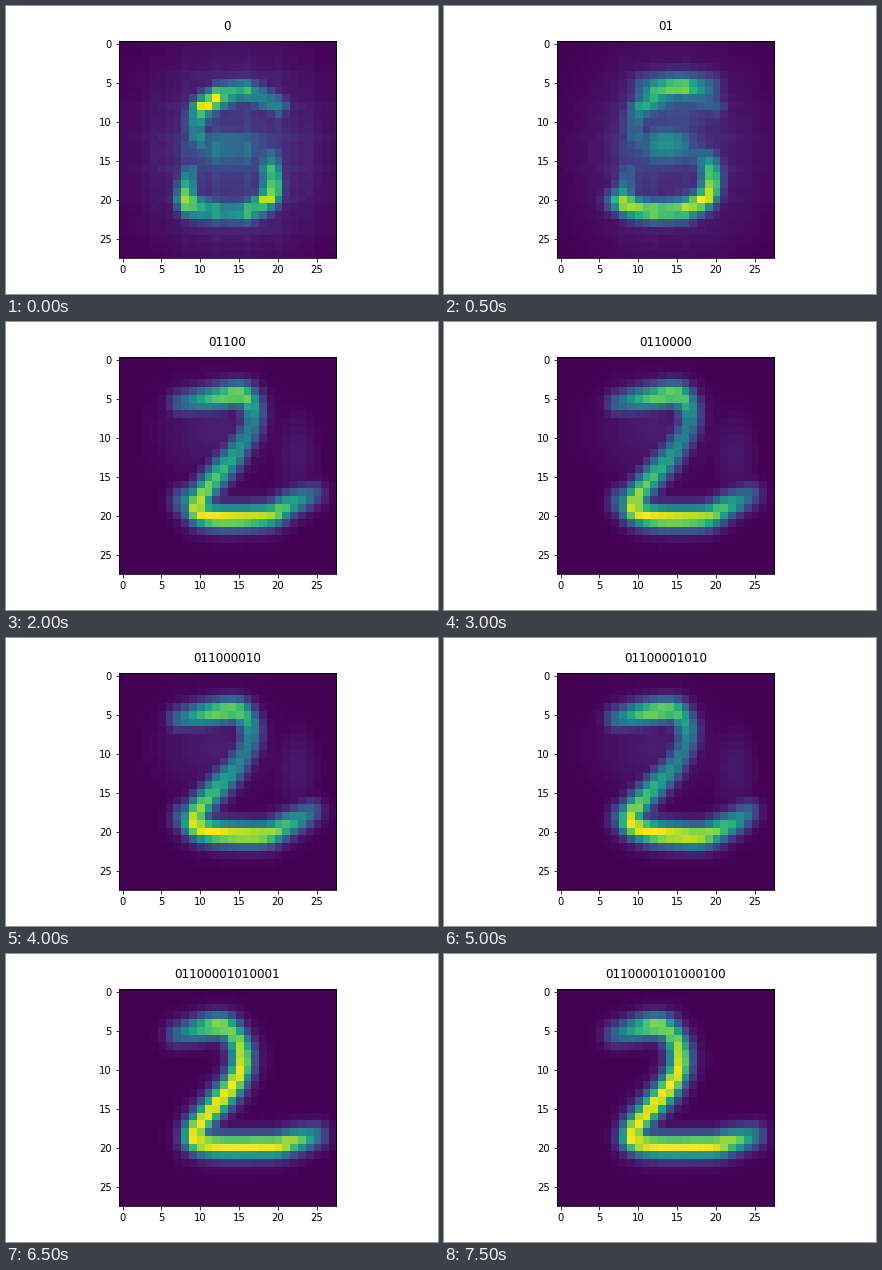
Recreate the animation shown at these times as a matplotlib script. Size 432x288 px, loop 8 s.

```python
import numpy as np
import matplotlib.pyplot as plt
from matplotlib.animation import FuncAnimation

N = 28
BITS = "0110000101000100"
gy, gx = np.mgrid[0:N, 0:N].astype(float)


def spline(pts, steps=24):
    """Catmull-Rom curve through the rows of pts."""
    p = np.asarray(pts, float)
    p = np.vstack([2 * p[0] - p[1], p, 2 * p[-1] - p[-2]])
    t = np.linspace(0, 1, steps)[:, None]
    parts = []
    for a, b, c, d in zip(p, p[1:], p[2:], p[3:]):
        parts.append(b + t / 2 * (c - a + t * (2 * a - 5 * b + 4 * c - d
                                               + t * (3 * b - a - 3 * c + d))))
    return np.vstack(parts)


def stroke(pts, width=1.45, halo=0.06):
    """Soft pen line through (x, y, strength) points."""
    x, y, v = spline(pts).T[:, :, None, None]
    d2 = ((gx - x) ** 2 + (gy - y) ** 2) / width ** 2
    return (v * ((1 - halo) * np.exp(-d2) + halo * np.exp(-d2 / 4))).max(axis=0)


def haze(x, y, sx, sy, v):
    return v * np.exp(-((gx - x) / sx) ** 2 - ((gy - y) / sy) ** 2)


def ink(*layers):
    img = np.maximum.reduce(layers)
    return img / img.max()


def average_digit():
    img = np.maximum.reduce([
        haze(14.5, 14, 10, 11, 0.19),
        haze(13.5, 13.5, 6.5, 3, 0.38),
        stroke([(20, 8, 0.36), (15.5, 6, 0.6), (10.8, 7.7, 0.86),
                (9.5, 10.5, 0.5), (10, 13, 0.42)]),
        stroke([(18.8, 14.5, 0.42), (19, 19, 0.82), (16.5, 21.4, 0.64),
                (12, 21.5, 0.54), (8.4, 20.4, 0.76), (8.8, 16, 0.3)]),
    ])
    # every fourth row and column is stronger
    return ink(img * np.where((gx % 4 == 0) | (gy % 4 == 0), 1.25, 1))


def three():
    return ink(
        stroke([(10.5, 5.4, 0.5), (15, 5.3, 1), (19, 5.4, 0.58)]),
        stroke([(7, 20.2, 0.8), (12, 21.5, 0.97), (18.2, 20, 0.96), (19.4, 16, 0.65),
                (17, 14, 0.3)], 1.35),
        haze(13.7, 12.8, 3, 2.3, 0.62),
        haze(14.5, 8, 5, 4, 0.3),
        haze(10, 14, 4, 9, 0.17),
        haze(14, 14, 9, 11, 0.07))


# pen paths of the two, same nine joints in each pose
LOOSE = [(7.3, 5.6, 0.3), (11.8, 4.9, 0.74), (15.5, 4.6, 0.84), (16.7, 7.8, 0.46),
         (14.6, 11.8, 0.56), (9.5, 19.3, 1), (18, 20.1, 0.92), (21.5, 18.5, 0.66),
         (24.5, 17.2, 0.3)]
CURVED = [(7.2, 5.5, 0.4), (11.3, 4.7, 0.84), (14.7, 4.6, 0.78), (16.2, 7.5, 0.5),
          (14.6, 11.4, 0.48), (8.9, 18.7, 1), (17, 20.6, 1), (21.5, 19.2, 0.7),
          (24, 17.5, 0.36)]
FIRM = [(7, 5.5, 0.32), (11.8, 4.4, 0.86), (14, 5.2, 0.8), (15.3, 8.3, 0.92),
        (14.2, 11.8, 1), (9.2, 18.9, 1), (18.5, 19.8, 1), (22, 19.2, 0.86),
        (24.8, 18.5, 0.42)]


def two(k):
    a = np.interp(k, [4, 10], [0, 1])
    b = np.interp(k, [10, 13], [0, 1])
    pose = np.array(LOOSE) * (1 - a) + np.array(CURVED) * a
    pose = pose * (1 - b) + np.array(FIRM) * b
    blur = 1 - b
    return ink(stroke(pose),
               haze(8.3, 18.2, 1.8, 1.8, 0.48 * blur),
               haze(22.3, 12, 2.5, 5, 0.07 * blur),
               haze(12, 9, 7, 6, 0.08 * blur))


def picture(k):
    if k >= 4:
        return two(k)
    first, last = (average_digit(), three()) if k < 2 else (three(), two(4))
    t = k % 2 / 2
    return ink(first * (1 - t) + last * t)


fig = plt.figure(figsize=(6, 4), dpi=72)
fig.subplots_adjust(left=0.125, right=0.9, bottom=0.125, top=0.88)
ax = fig.add_subplot()
im = ax.imshow(picture(0), cmap="viridis", vmin=0, vmax=1, interpolation="nearest")
title = ax.text(0.5, 1.05, BITS[0], transform=ax.transAxes, ha="center", size=12)


def update(k):
    im.set_data(picture(k))
    title.set_text(BITS[:k + 1])
    return im, title


anim = FuncAnimation(fig, update, frames=len(BITS), interval=500,
                     repeat=True, repeat_delay=0, blit=False)
plt.show()
```
